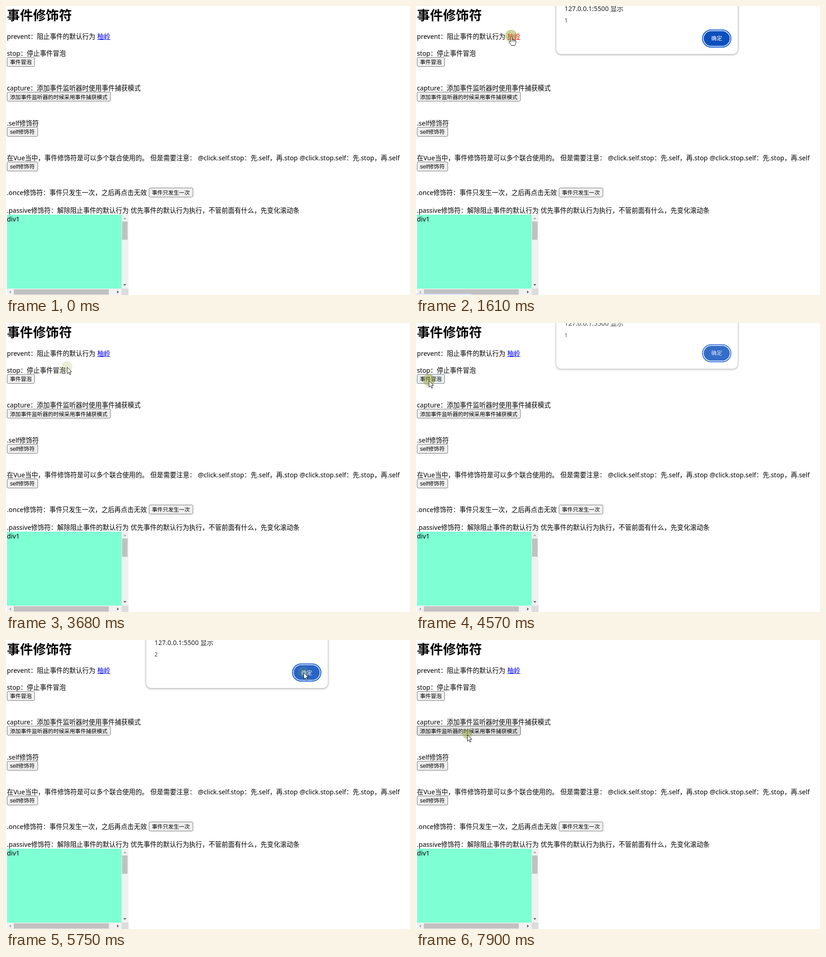
Recreate the animation shown at these times as an HTML page with a canvas. Size 884 by 633 pixels, loop 8 s.

```html
<!DOCTYPE html>
<html lang="zh-CN">
<head>
<meta charset="utf-8">
<style>
html, body { margin: 0; width: 100%; height: 100%; overflow: hidden; background: #fff; }
canvas { display: block; width: 884px; height: 633px; }
</style>
</head>
<body>
<canvas id="stage" width="884" height="633" lang="zh-CN"></canvas>
<script>
const ctx = document.getElementById('stage').getContext('2d');
const LOOP = 8000, STEP = 89.4;
const LEFT = 2, GAP = 4.3, PITCH = 76.25;
const CJK = '"Noto Sans CJK SC", "Noto Sans CJK", sans-serif';
const BODY = '14.22px "Noto Sans", ' + CJK;
const NOTE = '11.87px "Noto Sans", ' + CJK;
const SMALL = '11.87px "Liberation Sans", ' + CJK;

// inline phrases, then the button below them
const SECTIONS = [
  [['stop：停止事件冒泡'], '事件冒泡'],
  [['capture：添加事件监听器时使用事件捕获模式'], '添加事件监听器的时候采用事件捕获模式'],
  [['.self修饰符'], 'self修饰符'],
  [['在Vue当中，事件修饰符是可以多个联合使用的。', '但是需要注意：',
    '@click.self.stop：先.self，再.stop', '@click.stop.self：先.stop，再.self'], 'self修饰符']
];

const ENTER = { at: 260, x: 274, y: -4 };
const TRIPS = [
  { from: 260, to: 980, x: 180, y: 70 },
  { from: 1160, to: 1250, x: 208, y: 66 },
  { from: 2060, to: 2500, x: 638, y: 81 },
  { from: 3040, to: 4110, x: 28, y: 126 },
  { from: 4740, to: 5180, x: 651, y: 71 },
  { from: 5730, to: 6000, x: 652, y: 78 },
  { from: 6680, to: 7510, x: 112, y: 207 }
];
const CLICKS = [1420, 2680, 4370, 5180, 6160, 7850];
const DIALOGS = [
  { open: 1430, close: 2870, message: '1' },
  { open: 4470, close: 5270, message: '1' },
  { open: 5430, close: 6200, message: '2' }
];

let now = 0, mouse = ENTER, clickAge = Infinity;

const clamp = v => Math.max(0, Math.min(1, v));
const mix = (a, b, k) => a + (b - a) * k;
const over = (x, y, w, h) =>
  mouse.x >= x && mouse.x <= x + w && mouse.y >= y && mouse.y <= y + h;

function text(s, x, y, font, color = '#000') {
  ctx.font = font;
  ctx.fillStyle = color;
  ctx.fillText(s, x, y);
  return x + ctx.measureText(s).width;
}

function flow(phrases, y) {
  return phrases.reduce((x, s) => text(s, x, y, BODY) + GAP, LEFT);
}

function rect(x, y, w, h, color) {
  ctx.fillStyle = color;
  ctx.fillRect(x, y, w, h);
}

function pill(x, y, w, h, r, fill, stroke, width = 1) {
  ctx.beginPath();
  ctx.roundRect(x, y, w, h, r);
  ctx.fillStyle = fill;
  ctx.fill();
  if (!stroke) return;
  ctx.strokeStyle = stroke;
  ctx.lineWidth = width;
  ctx.stroke();
}

function drawLink(x, y) {
  const hover = over(x, y - 15, 29, 20);
  const color = hover ? '#f00' : '#00e';
  const end = text('柚岭', x, y, BODY, color);
  rect(x, y + 1, end - x, 1, color);
  return hover;
}

function drawButton(label, x, y) {
  ctx.font = SMALL;
  const w = ctx.measureText(label).width + 13.5;
  const hover = over(x, y, w, 20), pressed = hover && clickAge < 120;
  const fill = pressed ? '#e2e2e2' : hover ? '#e8ecf2' : '#efefef';
  pill(x + .5, Math.round(y) - .5, Math.round(w) - 1, 20, 2.5, fill, pressed ? '#555' : '#767676');
  text(label, x + 6.75, y + 14.3, SMALL);
}

function scrollArrow(x, y, turns, color) {
  ctx.save();
  ctx.translate(x, y);
  ctx.rotate(turns * Math.PI * 2);
  ctx.beginPath();
  ctx.moveTo(-3.3, 1.8);
  ctx.lineTo(0, -1.8);
  ctx.lineTo(3.3, 1.8);
  ctx.fillStyle = color;
  ctx.fill();
  ctx.restore();
}

function drawScroller() {
  rect(2, 457, 266, 176, '#f1f1f1');
  rect(2, 457, 251, 162, '#7fffd4');
  rect(253, 619, 15, 14, '#dcdcdc');
  rect(254, 472, 12, 40, '#c1c1c1');
  rect(17, 620.5, 208, 11.5, '#c1c1c1');
  scrollArrow(260, 465, 0, '#a3a3a3');
  scrollArrow(260, 611, .5, '#505050');
  scrollArrow(9, 626.5, -.25, '#a3a3a3');
  scrollArrow(245, 626.5, .25, '#505050');
  text('div1', LEFT, 471.5, BODY);
}

function drawPage() {
  rect(0, 0, 884, 633, '#fff');
  text('事件修饰符', LEFT, 31, 'bold 28.45px ' + CJK);
  const onLink = drawLink(flow(['prevent：阻止事件的默认行为'], 72), 72);
  SECTIONS.forEach(([phrases, label], i) => {
    const y = 109 + i * PITCH;
    flow(phrases, y);
    drawButton(label, LEFT, y + 4);
  });
  drawButton('事件只发生一次', flow(['.once修饰符：事件只发生一次，之后再点击无效'], 414), 399);
  flow(['.passive修饰符：解除阻止事件的默认行为', '优先事件的默认行为执行，不管前面有什么，先变化滚动条'], 453);
  drawScroller();
  if (onLink) pill(-4, 630.5, 128, 20, 4, '#eaf1fd', '#b3c8ec');
}

function drawDialog({ open, close, message }) {
  const rest = Math.pow(1 - clamp((now - open) / 200), 3);
  const gone = clamp((now - close) / 150);
  const alpha = (1 - rest) * (1 - gone);
  if (!alpha) return;
  ctx.save();
  ctx.translate(0, -30 * rest - 8 * gone);
  ctx.shadowColor = `rgba(0,0,0,${.4 * alpha})`;
  ctx.shadowBlur = 4;
  ctx.shadowOffsetY = 1;
  pill(306.5, -60, 398, 165.5, 11, '#fff');
  ctx.shadowColor = 'transparent';
  ctx.globalAlpha = alpha;
  pill(306.5, -60, 398, 165.5, 11, '#fff', '#d2d2d2');
  text('127.0.0.1:5500 显示', 325, 11, BODY, '#1f1f1f');
  text(message, 325, 36, NOTE, '#2b3a55');
  pill(627, 52.5, 62, 37.5, 18.7, '#fff', '#0b57d0', 2);
  pill(629.5, 55, 57, 32.5, 16.2, over(627, 52, 62, 38) ? '#2964c6' : '#0c50bc');
  text('确定', 646.1, 75.5, '500 11.87px ' + CJK, '#fff');
  ctx.restore();
}

// sideways motion leads, vertical motion follows
function pointerAt(t) {
  let { x, y } = ENTER;
  for (const trip of TRIPS) {
    const k = clamp((t - trip.from) / (trip.to - trip.from));
    x = mix(x, trip.x, 1 - (1 - k) ** 2);
    y = mix(y, trip.y, k * k);
  }
  return { x, y };
}

const ARROW = new Path2D('M0 0V14.2L3.3 11.2 5.6 16.3 7.8 15.3 5.6 10.4 9.8 10.1Z');
const HAND = new Path2D('M-1.6 12V1.5Q0-1 1.6 1.5V7Q3.5 5.5 4.6 7.6 6.5 6.5 7.4 8.4 9.8 8 10 10V14' +
  'Q9.8 17 7.8 20H.2Q-2.5 16-4.8 12.5-5 9.5-1.6 12M1.6 7V11.5M4.6 7.6V11.5M7.4 8.4V11.5');

function drawPointer() {
  if (now < ENTER.at) return;
  const clicked = clickAge < 230;
  const radius = clicked ? 10 + 3 * clamp(clickAge / 190) : 12;
  ctx.beginPath();
  ctx.arc(mouse.x, mouse.y - 1, radius, 0, Math.PI * 2);
  ctx.fillStyle = `rgba(150,165,50,${clicked ? .48 : .2})`;
  ctx.fill();
  ctx.save();
  ctx.translate(mouse.x + .5, mouse.y + .5);
  const icon = over(199, 57, 30, 20) ? HAND : ARROW;
  ctx.fillStyle = '#fff';
  ctx.fill(icon);
  ctx.strokeStyle = '#111';
  ctx.lineWidth = 1;
  ctx.stroke(icon);
  ctx.restore();
}

function draw(t) {
  now = t;
  mouse = pointerAt(t);
  clickAge = Math.min(...CLICKS.map(c => t >= c ? t - c : Infinity));
  drawPage();
  DIALOGS.forEach(drawDialog);
  drawPointer();
}

function tick() {
  const t = performance.now() % LOOP;
  draw(Math.floor(t / STEP) * STEP);
  requestAnimationFrame(tick);
}
tick();
</script>
</body>
</html>
```
